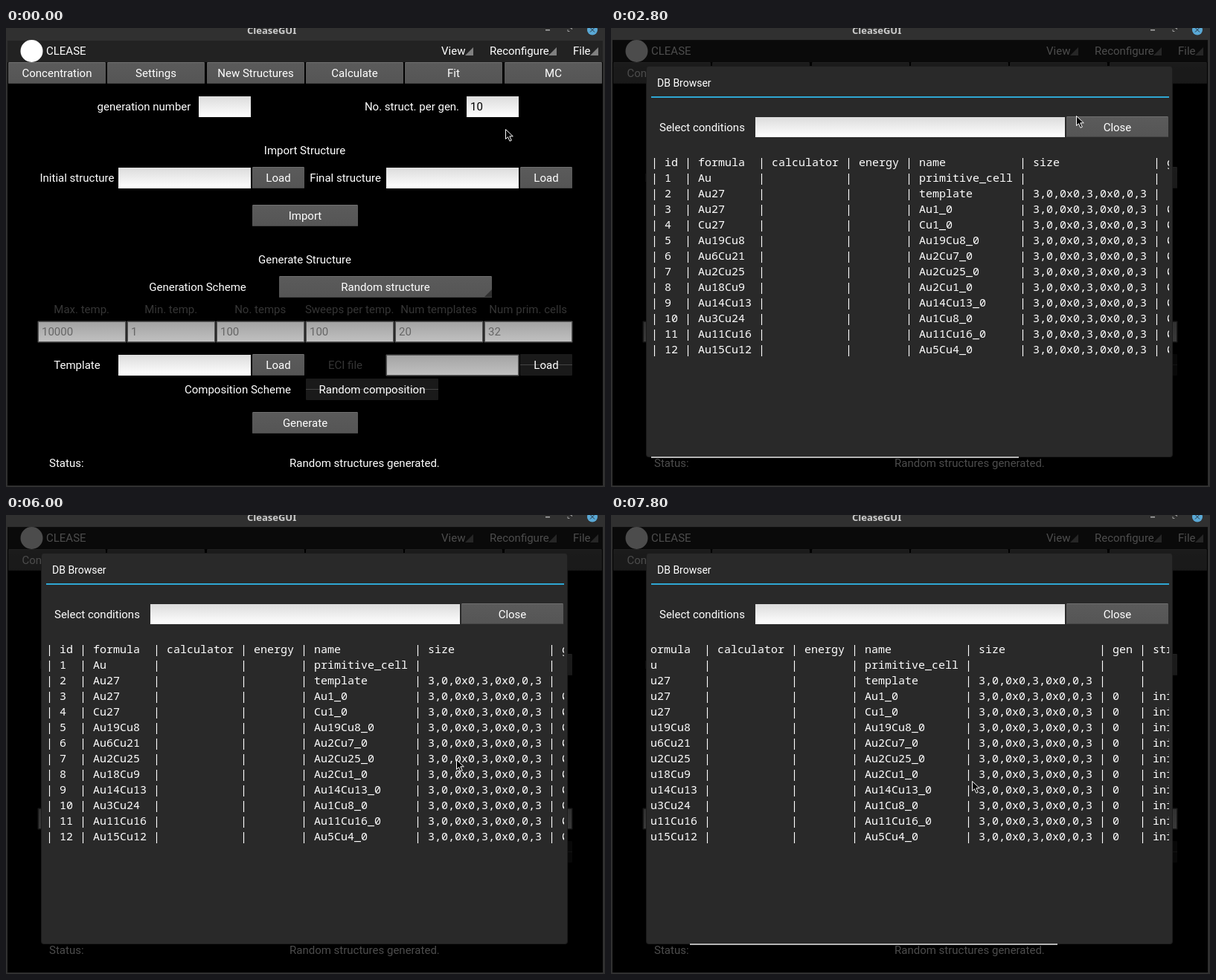
Write an HTML page that moves like this. It is 805 px wide and 618 px high and loops after 8000 ms.

```html
<!DOCTYPE html>
<html lang="en">
<head>
<meta charset="utf-8">
<title>CleaseGUI</title>
<style>
html, body { margin: 0; width: 100%; height: 100%; overflow: hidden; background: #000; }
svg { display: block; }
text { font: 15px Roboto, sans-serif; fill: #fff; white-space: pre; }
.mid { text-anchor: middle; }
.dim { fill: #353535; }
.ink { fill: #000; }
.faded { fill: #666; }
.title { font: bold 13px "Noto Sans", sans-serif; fill: #ccc; }
.heading { font-size: 14px; }
.mono { font: 15px "Noto Sans Mono", monospace; }
</style>
</head>
<body>
<svg width="805" height="618" viewBox="0 0 805 618">
  <defs>
    <linearGradient id="field" x2="0" y2="1"><stop stop-color="#dcdcdc"/><stop offset="1" stop-color="#fff"/></linearGradient>
    <linearGradient id="fieldOff" x2="0" y2="1"><stop stop-color="#a4a4a4"/><stop offset="1" stop-color="#c0c0c0"/></linearGradient>
    <linearGradient id="button" x2="0" y2="1"><stop stop-color="#5b5b5b"/><stop offset="1" stop-color="#555"/></linearGradient>
    <clipPath id="tableClip"><rect x="53" y="160" width="697" height="416"/></clipPath>
  </defs>
  <g id="main"></g>
  <g id="menu"></g>
  <g id="popup"></g>
  <path id="cursor" d="M.5 .5V13.5L3.5 10.7L6 16.3L8.3 15.2L5.8 9.8H10.3Z" fill="#000" stroke="#fff"/>
</svg>
<script>
const STEP = 200, LOOP = 8000;
const byId = id => document.getElementById(id);

function add(parent, tag, attrs, content = '') {
  const node = document.createElementNS('http://www.w3.org/2000/svg', tag);
  for (const key in attrs) node.setAttribute(key, attrs[key]);
  node.textContent = content;
  return parent.appendChild(node);
}
const rect = (g, x, y, width, height, fill, rx = 0) => add(g, 'rect', { x, y, width, height, fill, rx });
const path = (g, d, fill, stroke = 'none') => add(g, 'path', { d, fill, stroke });
const text = (g, x, y, content, cls = '') => add(g, 'text', { x, y, class: cls }, content);

function button(g, x, y, w, h, label) {
  rect(g, x, y, w, h, 'url(#button)', 1);
  rect(g, x + 1, y, w - 2, 1, '#707070');
  rect(g, x + 1, y + h - 1, w - 2, 1, '#444');
  text(g, x + w / 2, y + 20, label, 'mid');
}
function disabledButton(g, x, y, w, label) {
  rect(g, x, y, w, 29, '#1a1a1a', 1);
  rect(g, x, y + 14, w, 1, '#444');
  text(g, x + w / 2, y + 20, label, 'mid');
}
function field(g, x, y, w, h, value = '') {
  rect(g, x, y, w, h, 'url(#field)');
  text(g, x + 5, y + 19, value, 'ink');
}
function disabledField(g, x, y, w, value = '') {
  rect(g, x - .5, y - .5, w + 1, 29, '#555', 1);
  rect(g, x + 1, y + 1, w - 2, 26, 'url(#fieldOff)');
  text(g, x + 5, y + 19, value, 'faded');
}

function buildMain(g) {
  rect(g, 0, 0, 805, 618, '#303030');
  rect(g, 2, 17, 800, 599, '#000');
  text(g, 324, 8, 'CleaseGUI', 'title');
  rect(g, 725, 2, 6, 1.5, '#aaa');
  path(g, 'M755 2V4.5H757.5M758.5 .5H760.5V2', 'none', '#999');
  add(g, 'circle', { cx: 788, cy: 2.5, r: 7, fill: '#5aa9d6' });
  path(g, 'M785 -.5L791 5.5M791 -.5L785 5.5', 'none', '#26313a');

  rect(g, 2, 17, 800, 29, '#222');
  add(g, 'circle', { cx: 34.5, cy: 31, r: 15, fill: '#fff' });
  text(g, 54, 36, 'CLEASE');
  [['View', 585, 628], ['Reconfigure', 650, 740], ['File', 762, 796]].forEach(([label, x, right]) => {
    path(g, `M${right} 26V37H${right - 11}Z`, '#808080');
    text(g, x, 36, label);
  });
  ['Concentration', 'Settings', 'New Structures', 'Calculate', 'Fit', 'MC'].forEach((label, i) =>
    button(g, Math.round(3 + i * 133.35), 46, 131, 29, label));

  text(g, 185.5, 111, 'generation number', 'mid');
  field(g, 259, 92, 70, 28);
  text(g, 545.5, 111, 'No. struct. per gen.', 'mid');
  field(g, 619, 92, 70, 28, '10');

  text(g, 401.5, 170, 'Import Structure', 'mid');
  text(g, 95.5, 207, 'Initial structure', 'mid');
  text(g, 456, 207, 'Final structure', 'mid');
  [151, 511].forEach(x => {
    field(g, x, 188, 178, 28);
    button(g, x + 180, 187, 70, 29, 'Load');
  });
  button(g, 331, 238, 142, 29, 'Import');

  text(g, 401.5, 317, 'Generate Structure', 'mid');
  text(g, 257.5, 354, 'Generation Scheme', 'mid');
  button(g, 367, 334, 286, 29, 'Random structure');
  path(g, 'M653 352V362H643Z', '#303030');
  [['Max. temp.', '10000'], ['Min. temp.', '1'], ['No. temps', '100'],
   ['Sweeps per temp.', '100'], ['Num templates', '20'], ['Num prim. cells', '32']].forEach(([label, value], i) => {
    text(g, 101.7 + i * 120, 384, label, 'mid dim');
    disabledField(g, 43 + i * 120, 395, 118, value);
  });

  text(g, 95.5, 459, 'Template', 'mid');
  field(g, 151, 440, 178, 28);
  button(g, 331, 439, 70, 29, 'Load');
  text(g, 456, 459, 'ECI file', 'mid dim');
  disabledField(g, 511, 440, 178);
  disabledButton(g, 691, 439, 70, 'Load');
  text(g, 311.5, 492, 'Composition Scheme', 'mid');
  disabledButton(g, 403, 472, 178, 'Random composition');
  button(g, 331, 517, 142, 29, 'Generate');
  text(g, 58, 591, 'Status:');
  text(g, 381, 591, 'Random structures generated.');
}

function buildMenu(g) {
  rect(g, 569, 46, 100, 144, '#171717');
  ['Clusters', 'DB', 'MC cell'].forEach((label, i) => {
    rect(g, 569, 46 + i * 48, 100, 47, '#222');
    text(g, 618.5, 75 + i * 48, label, 'mid');
  });
}

function tableLines() {
  const widths = [2, 8, 10, 6, 14, 17, 3, 11];
  const line = cells => cells.map((cell, i) => '| ' + String(cell).padEnd(widths[i] + 1)).join('');
  const rows = [['Au', 'primitive_cell'], ['Au27', 'template'], ['Au27', 'Au1_0'], ['Cu27', 'Cu1_0'],
    ['Au19Cu8', 'Au19Cu8_0'], ['Au6Cu21', 'Au2Cu7_0'], ['Au2Cu25', 'Au2Cu25_0'], ['Au18Cu9', 'Au2Cu1_0'],
    ['Au14Cu13', 'Au14Cu13_0'], ['Au3Cu24', 'Au1Cu8_0'], ['Au11Cu16', 'Au11Cu16_0'], ['Au15Cu12', 'Au5Cu4_0']];
  return [
    line(['id', 'formula', 'calculator', 'energy', 'name', 'size', 'gen', 'struct_type']),
    ...rows.map(([formula, name], i) => line([i + 1, formula, '', '', name,
      i ? '3,0,0x0,3,0x0,0,3' : '', i > 1 ? 0 : '', i > 1 ? 'initial' : '']))
  ];
}

function buildPopup(g) {
  add(rect(g, 2, 16, 800, 600, '#000'), 'title', {}).parentNode.setAttribute('opacity', .7);
  rect(g, 47, 51, 708, 527, '#1c1c1c', 4);
  rect(g, 48, 52, 706, 525, '#292929', 3);
  text(g, 62, 79, 'DB Browser', 'heading');
  rect(g, 54, 92, 696, 2, '#2fa7d4');
  text(g, 65, 139, 'Select conditions');
  field(g, 194, 120, 416, 27);
  button(g, 612, 119, 137, 28, 'Close');
  const table = add(add(g, 'g', { 'clip-path': 'url(#tableClip)' }), 'g', {});
  tableLines().forEach((line, i) => text(table, 54, 186 + i * 21, line, 'mono'));
  const bar = rect(g, 54, 577, 494, 2, '#b4b4b4');
  return { table, bar };
}

// Pointer waypoints: time, x, y
const route = [
  [0, 671, 136], [800, 625, 31], [1200, 625, 31], [1800, 625, 118], [2800, 625, 118],
  [3800, 302, 308], [4200, 263, 329], [4400, 263, 329], [4600, 332, 349], [5000, 609, 340],
  [5800, 609, 340], [6000, 605, 329], [6600, 449, 350], [7000, 506, 353],
  [7200, 556, 353], [7400, 556, 353], [7600, 553, 356], [7800, 485, 358]
];

function pointerAt(t) {
  const next = route.findIndex(p => p[0] > t);
  if (next < 0) return route[route.length - 1].slice(1);
  const a = route[next - 1], b = route[next];
  const k = (t - a[0]) / (b[0] - a[0]);
  return [1, 2].map(i => Math.round(a[i] + (b[i] - a[i]) * k));
}

const menu = byId('menu'), popup = byId('popup'), cursor = byId('cursor');
buildMain(byId('main'));
buildMenu(menu);
const { table, bar } = buildPopup(popup);
const show = (node, on) => node.setAttribute('visibility', on ? 'visible' : 'hidden');

function render(now) {
  const t = Math.floor(now % LOOP / STEP) * STEP;
  const scrolled = t >= 7800;
  show(menu, t >= 1200 && t < 2800);
  show(popup, t >= 2800);
  table.setAttribute('transform', `translate(${scrolled ? -73 : 0})`);
  bar.setAttribute('x', scrolled ? 106 : 54);
  bar.setAttribute('opacity', scrolled ? 1 : Math.max(0, Math.min(1, (3600 - t) / 600)));
  cursor.setAttribute('transform', `translate(${pointerAt(t)})`);
}

const start = performance.now();
function tick() {
  render(performance.now() - start);
  requestAnimationFrame(tick);
}
tick();
</script>
</body>
</html>
```
